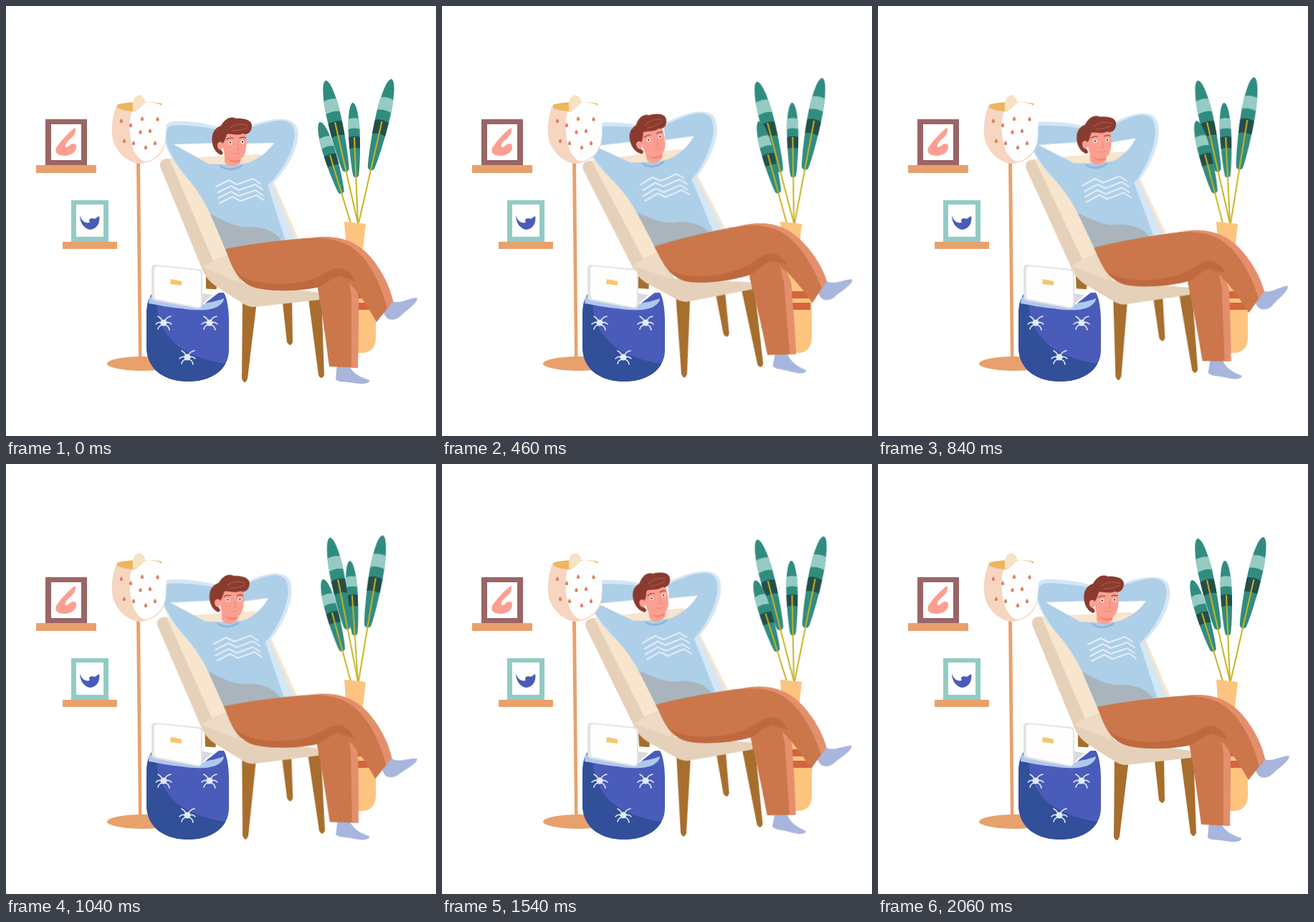
Write an HTML page that moves like this. It is 600 px wide and 600 px high and loops after 2.08 s.

```html
<!DOCTYPE html>
<html lang="en">
<head>
<meta charset="utf-8">
<title>Relaxing at home</title>
<style>
html, body { margin: 0; width: 100%; height: 100%; overflow: hidden; background: #fff; }
svg { display: block; width: 100vw; height: 100vh; }

.move { animation: 2080ms cubic-bezier(.37, 0, .63, 1) infinite; }
.rock { animation-name: rock; transform-origin: 253px 455px; }
.head { animation-name: head; transform-origin: 311px 218px; }
.arm { animation-name: arm; transform-origin: 350px 228px; }
.thigh { animation-name: thigh; transform-origin: 320px 350px; }
.toes { animation-name: toes; transform-origin: 530px 424px; }
.sole { animation-name: sole; transform-origin: 470px 504px; }
.leaf1 { animation-name: leaf1; transform-origin: 491px 303px; }
.leaf2 { animation-name: leaf2; transform-origin: 481px 303px; }
.leaf3 { animation-name: leaf3; transform-origin: 491px 303px; }
.leaf4 { animation-name: leaf4; transform-origin: 492px 303px; }

@keyframes rock {
  0%, 100% { transform: rotate(0deg); }
  25% { transform: rotate(-4.75deg); }
  50% { transform: rotate(-1deg); }
  76.9% { transform: rotate(-3.75deg); }
}
@keyframes head {
  0%, 100% { transform: rotate(0deg); }
  15.9% { transform: rotate(-8deg); }
  50% { transform: rotate(2deg); }
  78.8% { transform: rotate(-7.5deg); }
}
@keyframes arm {
  0%, 12%, 100% { transform: rotate(0deg); }
  40.9% { transform: rotate(-6deg); }
  72.1% { transform: rotate(-.5deg); }
}
@keyframes thigh {
  0%, 100% { transform: rotate(0deg); }
  29.8% { transform: rotate(-1.8deg); }
  57.7% { transform: rotate(1.4deg); }
  86.5% { transform: rotate(-.3deg); }
}
@keyframes toes {
  0%, 100% { transform: rotate(0deg); }
  15.9% { transform: rotate(11.5deg); }
  37.5% { transform: rotate(-2deg); }
  60.6% { transform: rotate(14.5deg); }
  85.6% { transform: rotate(0deg); }
}
@keyframes sole {
  0%, 100% { transform: rotate(0deg); }
  25% { transform: rotate(11deg); }
  50% { transform: rotate(3deg); }
  75% { transform: rotate(10deg); }
}
@keyframes leaf1 {
  0%, 100% { transform: rotate(0deg); }
  28.8% { transform: rotate(-2.2deg); }
  50% { transform: rotate(1.7deg); }
  79.8% { transform: rotate(-2.1deg); }
}
@keyframes leaf2 {
  0%, 100% { transform: rotate(0deg); }
  37.5% { transform: rotate(2.6deg); }
  72.1% { transform: rotate(-.4deg); }
}
@keyframes leaf3 {
  0%, 100% { transform: rotate(0deg); }
  21.2% { transform: rotate(1.6deg); }
  54.8% { transform: rotate(-1.6deg); }
  81.7% { transform: rotate(1.8deg); }
}
@keyframes leaf4 {
  0%, 100% { transform: rotate(0deg); }
  40.9% { transform: rotate(-3.7deg); }
}

.wood { fill: #e8a16c; }
.brown { fill: #a86e2d; }
.beige { fill: #e5d1b9; }
.cream { fill: #f7e5cd; }
.knit { fill: #aecfe8; }
.pale { fill: #d5e6f4; }
.cloth { fill: #cb774b; }
.shade { fill: #bf693f; }
.glow { fill: #e38f6c; }
.sock { fill: #a8b5dc; }
.skin { fill: #fc9f90; }
.hair { fill: #8a3b2f; }
.blue { fill: #4a5cb9; }
.line { fill: none; stroke-linecap: round; stroke-linejoin: round; }
.stem { fill: none; stroke: #c8b323; stroke-width: 2; }
</style>
</head>
<body>
<svg viewBox="0 0 600 600">
  <defs>
    <path id="blade" d="M0 0C6 1 9.500 22 10 50C10 80 7 118 4.500 128Q0 133 -4.500 128C-7 118 -10 80 -10 50C-9.500 22 -6 1 0 0Z"/>
    <clipPath id="bladeClip"><use href="#blade"/></clipPath>
    <g id="leaf">
      <use href="#blade" fill="#318c80"/>
      <g clip-path="url(#bladeClip)">
        <path d="M-12 29Q0 24 12 29V47Q0 42 -12 47Z" fill="#95cbc3"/>
        <path d="M-12 61Q0 56 12 61V81Q0 76 -12 81Z" fill="#244f49"/>
      </g>
    </g>
    <path id="drop" d="M0 -3C1.500 -1 2.200 0 2.200 1A2.200 2.200 0 0 1 -2.200 1C-2.200 0 -1.500 -1 0 -3Z"/>
    <g id="bug">
      <circle r="4.500" fill="#e2eaf7"/>
      <path class="line" d="M-2 -3Q-4 -7 -8 -9M2 -3Q4 -8 10 -9M-3 0Q-7 -2 -11 2M3 0Q7 -2 11 2M-2 3Q-7 4 -8 9M2 3Q7 4 8 10" stroke="#e2eaf7" stroke-width="1.600"/>
    </g>
    <path id="zig" d="M293 252l18 -9 11 6 23 -8 10 7"/>
    <path id="bag" d="M203 402L304 400C309 408 311 425 311 440V480C311 509 284 524 254 524C225 524 196 510 196 475V440C196 425 196 412 203 402Z"/>
    <clipPath id="bagClip"><use href="#bag"/></clipPath>
  </defs>

  <!-- pictures -->
  <path class="wood" d="M42 222h84v11h-84zM79 329h76v10h-76z"/>
  <path fill="#9a6565" d="M55 158h58v64h-58z"/>
  <path fill="#fff" d="M63 165h42v50h-42z"/>
  <path class="skin" d="M97 170C89 174 76 189 70 198C67 206 74 209 83 209C92 208 99 203 98 195C96 190 91 192 87 196C83 199 81 195 85 190C92 183 98 180 97 170Z"/>
  <path fill="#92cbc4" d="M91 271h52v58h-52z"/>
  <path fill="#fff" d="M98 277h38v45h-38z"/>
  <path class="blue" d="M103 292C105 299 110 304 117 302C114 297 119 295 124 297L130 293C132 303 126 312 117 312C109 311 103 302 103 292Z"/>

  <!-- plant -->
  <g class="move leaf4">
    <use href="#leaf" transform="translate(538 102) rotate(13)"/>
    <path class="stem" d="M524.500 161L492 303"/>
  </g>
  <g class="move leaf3">
    <use href="#leaf" transform="translate(484 135) rotate(-2.400) scale(.8)"/>
    <path class="stem" d="M486 183L491 303"/>
  </g>
  <g class="move leaf1">
    <use href="#leaf" transform="translate(446 104) rotate(-12.700)"/>
    <path class="stem" d="M459 162L491 303"/>
  </g>
  <g class="move leaf2">
    <use href="#leaf" transform="translate(438 162) rotate(-17) scale(.88 .8)"/>
    <path class="stem" d="M452 208L481 303"/>
  </g>
  <path fill="#fcc47f" d="M472 301L502 304L498 340C501 362 516 380 516 405V465C515 477 508 484 497 484H482L475 340Z"/>
  <path fill="#d5643f" d="M470 398H513V408H470zM470 414H514V424H470z"/>

  <!-- chair and sitter -->
  <g class="move rock">
    <path class="brown" d="M279 376L295 386L293 398L279 396ZM330 412H350L337 520Q333 530 329 520ZM385 405H399L400 469Q397 477 392 469ZM421 400H440L444 515Q440 523 436 515Z"/>
    <path class="cream" d="M224 213L348 207Q357 206 360 213L410 330L286 362Z"/>
    <path class="beige" d="M215 224Q214 212 228 213L289 355L312 347L330 386L437 400V410L346 420Q339 420 332 416L296 393Q278 382 272 363Z"/>
    <path fill="#eddbc5" d="M274 364L288 356L311 348L326 386Z"/>

    <path class="pale" d="M298 169C270 161 238 159 229 162C219 166 220 178 221 187C225 207 240 227 260 249L265 240L230 190L298 176Z"/>
    <path class="knit" d="M298 173C270 167 240 165 231 167C223 170 222 178 223 187C227 205 240 226 260 248L300 245L282 220L234 193L296 191Z"/>
    <g class="move arm">
      <path class="pale" d="M334 169C355 161 378 155 393 159C406 162 409 172 407 187C404 205 392 228 371 249L350 240L395 190L380 175Z"/>
      <path class="knit" d="M334 172C355 165 378 157 391 161C402 165 404 173 402 187C399 205 386 228 367 249L325 250L335 220L346 215Q364 206 374 191L334 192Z"/>
    </g>
    <path class="knit" d="M300 221L279 220L258 246Q275 268 285 290L308 344L400 330L367 247L346 217L328 221Z"/>
    <path class="pale" d="M365 250L371 246L404 328H390Z"/>
    <path fill="#a9b4bd" d="M285 290C304 299 320 311 345 308C365 310 381 318 385 330L308 344Z"/>
    <path fill="#8fb5dc" d="M298 221Q313 232 330 220L329 224Q314 234 299 225Z"/>
    <g class="line" stroke="#e6eef7" stroke-width="2">
      <use href="#zig"/><use href="#zig" x="3" y="8"/><use href="#zig" x="3" y="16"/><use href="#zig" x="5" y="23"/>
    </g>

    <g class="move head">
      <path class="skin" d="M301 190C303 200 306 208 305 218Q314 229 327 219L328 213C335 209 337 195 335 178L305 175Z"/>
      <path fill="#ea8673" d="M308 212Q316 218 327 214L326 217Q314 221 308 212Z"/>
      <path class="hair" d="M300 208C289 203 286 190 288 180C290 172 295 169 300 167C305 158 313 153 321 157C333 156 344 160 343 168C343 175 337 181 330 178C322 182 314 177 308 179C306 186 304 191 302 192C296 188 293 193 297 199Q302 201 303 206Z"/>
      <ellipse class="skin" cx="299" cy="195" rx="4" ry="5.500"/>
      <path class="line" d="M312 170Q324 161 337 167M315 174Q328 174 336 170" stroke="#b5614c" stroke-width="1"/>
      <path class="line" d="M308 186Q312 183 317 184.500M326 184.500Q330 182 334 184" stroke="#8a3b2f" stroke-width="1.200"/>
      <g fill="#fff"><circle cx="313" cy="190.500" r="2.500"/><circle cx="330" cy="189.500" r="2.500"/></g>
      <g fill="#3c2524"><circle cx="313" cy="190.500" r="1.200"/><circle cx="330" cy="189.500" r="1.200"/></g>
      <path class="line" d="M323 192L325 200L321 201M317 205Q322 208 327 205" stroke="#ea8673" stroke-width="1"/>
    </g>

    <path class="sock move sole" d="M462 498L478 500C483 513 495 518 507 522C508 528 494 528 485 526C475 524 464 526 460 521Z"/>
    <path class="cloth" d="M435 385L470 368C484 382 492 398 492 410L491 505L451 503C447 470 440 420 435 395Z"/>
    <path class="glow" d="M478 380C486 390 492 400 492 410L491 505L482 504V404Z"/>

    <g class="move thigh">
      <path class="sock move toes" d="M526 424L536 410C548 418 560 408 573 407C577 412 560 424 552 431C547 437 541 439 534 437Q528 434 526 424Z"/>
      <path class="cloth" d="M306 339C340 332 395 325 440 322.500C470 321 492 331 510 352C528 374 536 395 540 412L517 441C505 420 490 395 471 379C462 373 452 384 440 391C415 398 360 400 340 390C320 380 314 360 306 339Z"/>
      <path class="shade" d="M322 371C340 391 395 391 425 382C445 376 459 360 474 368Q482 373 488 384L471 379C462 372 450 386 437 392C410 399 360 399 342 391C332 386 326 380 322 371Z"/>
      <path class="glow" d="M425 323.500C470 318 492 331 510 352C528 374 536 395 540 412L532 422C526 399 516 373 499 352C482 332 462 323 425 323.500Z"/>
    </g>
  </g>

  <!-- lamp -->
  <ellipse class="wood" cx="191" cy="499" rx="50" ry="10"/>
  <path class="wood" d="M182 216H187L189.500 491H185Z"/>
  <path fill="#f6d5c1" d="M154 139C147 157 147 175 149 186C154 204 169 218 186 220C206 219 222 206 223 186L200 145Z"/>
  <path fill="#edb65e" d="M155 138C165 133 205 133 217 136V144C200 150 160 148 155 141Z"/>
  <path fill="#f5e3c4" d="M177 136C178 122 191 121 194 132L196 142L177 147Z"/>
  <path fill="#fefefe" d="M175 148C181 148 187 143 193 136C198 132 204 135 209 135.500C213 136 217 138 219 142C224 155 224 172 223 183C221 203 208 215 194 217C182 214 174 197 173 176C172 165 173 156 175 148Z"/>
  <g fill="#dd8362">
    <use href="#drop" x="161" y="160"/><use href="#drop" x="174" y="166"/><use href="#drop" x="190" y="157"/>
    <use href="#drop" x="211.500" y="157.500"/><use href="#drop" x="187.500" y="175.500"/><use href="#drop" x="201" y="174"/>
    <use href="#drop" x="165" y="188"/><use href="#drop" x="178" y="191"/><use href="#drop" x="208" y="191"/>
    <use href="#drop" x="195" y="197"/>
  </g>

  <!-- bag and laptop -->
  <use href="#bag" class="blue"/>
  <path clip-path="url(#bagClip)" fill="#324f99" d="M190 408L210 414C213 455 236 490 312 500V530H190Z"/>
  <path fill="#afc8ee" d="M201 405C213 413 250 419 275 415C290 413 299 410 304 408Q304 414 296 419C285 426 262 425 245 422C228 421 212 417 199 415Q199 409 201 405Z"/>
  <path fill="#fff" d="M272 394L302 396L275 417Z"/>
  <path fill="#d9dae2" d="M273 401L288 403L274 416Z"/>
  <path fill="#e4e2e4" d="M208 361L269 367Q274 368 274 373V417Q273 423 267 422L208 411Q203 410 203 405V366Q204 361 208 361Z"/>
  <path fill="#fefefe" d="M212 363L268 369Q272 370 272 374V416Q271 421 266 420L211 409Q207 408 207 404V367Q208 363 212 363Z"/>
  <path fill="#f9c56f" d="M230 381L245 384V390L229 388Z"/>
  <use href="#bug" x="220" y="442"/>
  <use href="#bug" x="284" y="442"/>
  <use href="#bug" x="253" y="490"/>
</svg>
</body>
</html>
```
